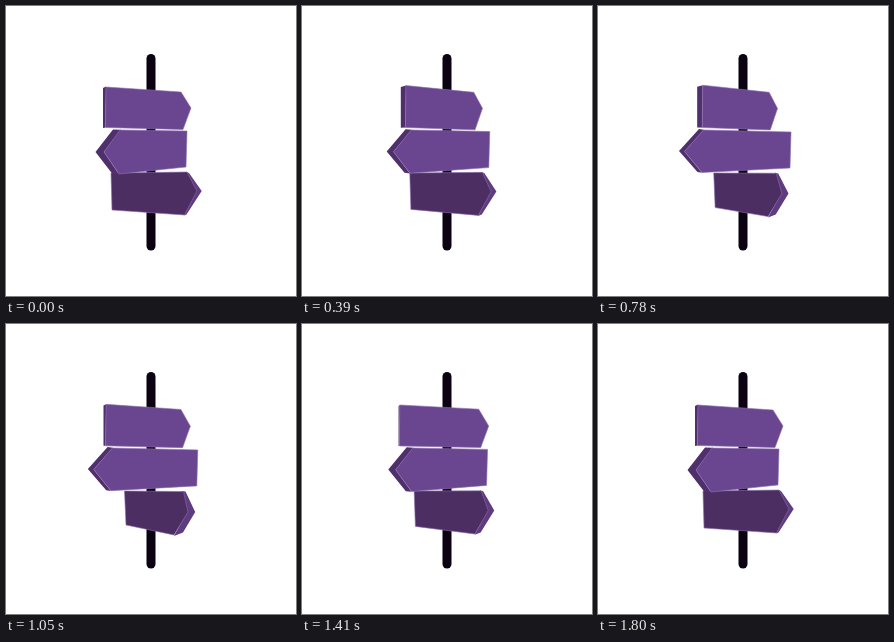
Animation, 290 px wide and 290 px high, one loop 1830 ms. Source, as an HTML page without scripts:

```html
<!DOCTYPE html>
<html lang="en">
<head>
<meta charset="utf-8">
<title>Signpost</title>
<style>
  html, body { margin: 0; width: 100%; height: 100%; overflow: hidden; background: #fff; }
  svg { display: block; width: 100vw; height: 100vh; }
  path { animation: 1.83s cubic-bezier(.33, 0, .67, 1) infinite; }
  .lit { fill: #6a4590; }
  .dim { fill: #4d2e63; }
  .edge { fill: #4f2f6c; }
  .rim { fill: #5f3c7f; }
  .lit, .dim { stroke: #8c70ac; stroke-width: .6; stroke-linejoin: round; }

  .top .edge { animation-name: top-edge; }
  .top .lit { animation-name: top-face; }
  .mid .edge { animation-name: mid-edge; }
  .mid .lit { animation-name: mid-face; }
  .low .rim { animation-name: low-rim; }
  .low .dim { animation-name: low-face; }

  /* top sign: turns away, swings past rest, settles */
  @keyframes top-face {
    0%, 98.4%, 100% { d: path("M100 81L175 86L185 102L177 123.5L99.5 121.5Z"); }
    32.8%, 36.1% { d: path("M105.5 79L170.5 86.5L178.7 102.5L171.5 124L105 121.5Z"); }
    70.5% { d: path("M97.5 81L177 85L187 102L179 123.5L97 122Z"); }
  }
  @keyframes top-edge {
    0%, 98.4%, 100% { d: path("M97 82L100 80.5L99.5 121.5L97 122Z"); }
    32.8%, 36.1% { d: path("M99.5 80.5L105.5 79L105 121.5L99.5 121.5Z"); }
    70.5% { d: path("M96.5 82L97.5 81L97 122L96.5 122Z"); }
  }

  /* middle sign */
  @keyframes mid-face {
    0%, 98.4%, 100% { d: path("M114 124L181 125L180 161L113 168L98 146Z"); }
    39.3%, 47.5% { d: path("M105.5 124L193 126L192 162L104 166.5L86.5 145.5Z"); }
  }
  @keyframes mid-edge {
    0%, 98.4%, 100% { d: path("M107 123.5L115 123.7L98 146L113 168.3L106.5 168L89.5 146Z"); }
    39.3%, 47.5% { d: path("M101 123L106 123.7L86.5 145.5L104 166.8L99.5 166L81 145Z"); }
  }

  /* bottom sign */
  @keyframes low-face {
    0%, 6.6%, 98.4%, 100% { d: path("M105 167L181 166L191 185L178.5 209L106 204Z"); }
    57.4% { d: path("M118.5 167L177.5 167.5L182 188L168 211L120 201Z"); }
  }
  @keyframes low-rim {
    0%, 6.6%, 98.4%, 100% { d: path("M180 165.7L183 167L195.7 185L180.5 208.5L178 209.5L190 185Z"); }
    57.4% { d: path("M176 167L179.5 167.5L189.2 188L177 208.5L168 212L181 188Z"); }
  }
</style>
</head>
<body>
<svg viewBox="0 0 290 290" xmlns="http://www.w3.org/2000/svg">
  <path d="M145 52.5V240" stroke="#0b0312" stroke-width="9" stroke-linecap="round"/>
  <g class="low">
    <path class="rim" d="M180 165.7L183 167L195.7 185L180.5 208.5L178 209.5L190 185Z"/>
    <path class="dim" d="M105 167L181 166L191 185L178.5 209L106 204Z"/>
  </g>
  <g class="mid">
    <path class="edge" d="M107 123.5L115 123.7L98 146L113 168.3L106.5 168L89.5 146Z"/>
    <path class="lit" d="M114 124L181 125L180 161L113 168L98 146Z"/>
  </g>
  <g class="top">
    <path class="edge" d="M97 82L100 80.5L99.5 121.5L97 122Z"/>
    <path class="lit" d="M100 81L175 86L185 102L177 123.5L99.5 121.5Z"/>
  </g>
</svg>
</body>
</html>
```
